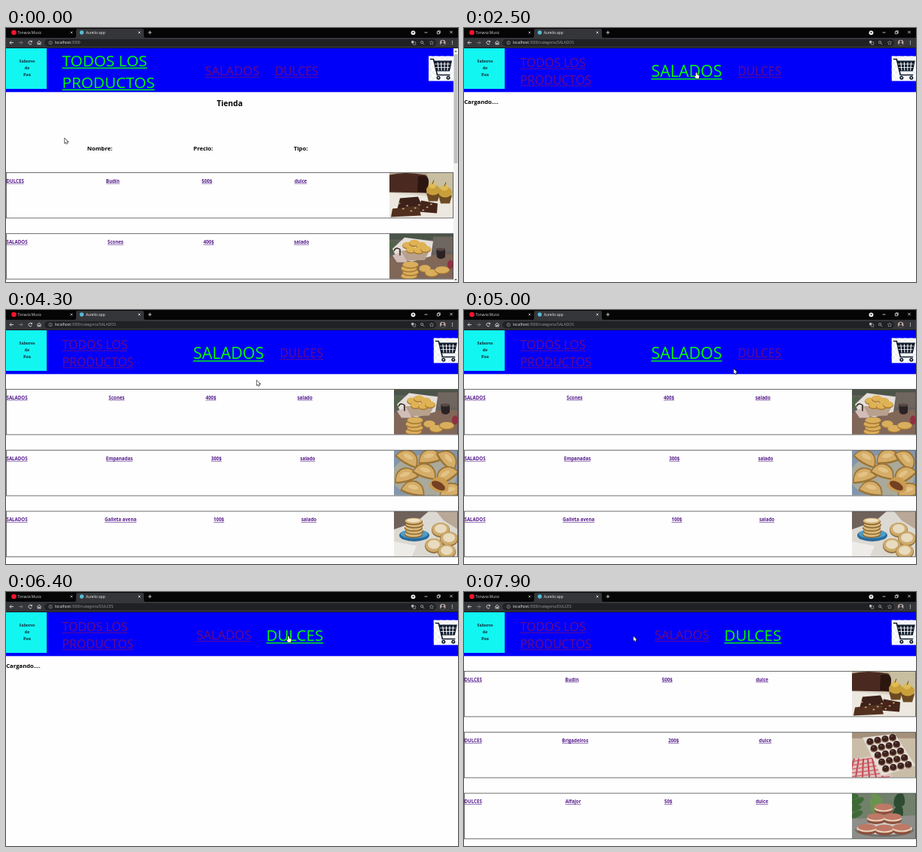
Animation, 600 px wide and 338 px high, one loop 8 s. Source, as an HTML page with a canvas:

```html
<!DOCTYPE html>
<html lang="es">
<head>
<meta charset="utf-8">
<title>Tienda</title>
<style>
html, body { margin: 0; width: 100%; height: 100%; overflow: hidden; background: #fff; }
canvas { display: block; width: 600px; height: 338px; }
</style>
</head>
<body>
<canvas id="stage"></canvas>
<script>
const W = 600, H = 338, LOOP = 8000;
const canvas = document.getElementById('stage');
const ctx = canvas.getContext('2d');
const dpr = window.devicePixelRatio || 1;
canvas.width = W * dpr;
canvas.height = H * dpr;

const SANS = '"Open Sans", "Noto Sans", sans-serif';
const GREEN = '#00ff00', VISITED = '#551a8b', NAV_LINK = '#6c0a80';

// ---- drawing helpers ----
function rect(x, y, w, h, color) {
  ctx.fillStyle = color;
  ctx.fillRect(x, y, w, h);
}
function oval(x, y, rx, ry, color, turn = 0) {
  ctx.fillStyle = color;
  ctx.beginPath();
  ctx.ellipse(x, y, rx, ry, turn, 0, 7);
  ctx.fill();
}
function path(d, color) {
  ctx.fillStyle = color;
  ctx.fill(new Path2D(d));
}
function line(d, color, width = 0.7) {
  ctx.strokeStyle = color;
  ctx.lineWidth = width;
  ctx.stroke(new Path2D(d));
}
function setFont(size, weight = 400, family = SANS) {
  ctx.font = `${weight} ${size}px ${family}`;
}
function text(s, x, y, color) {
  ctx.fillStyle = color;
  ctx.fillText(s, x, y);
  return ctx.measureText(s).width;
}
function link(s, x, y, color, gap, thick) {
  rect(x, y + gap, text(s, x, y, color), thick, color);
}
function at(x, y, draw) {
  ctx.save();
  ctx.translate(x, y);
  draw();
  ctx.restore();
}

// ---- product photos, 85 x 60 ----
function cookie(x, y, rx, ry, light = '#d9ae5c', dark = '#a87832') {
  oval(x, y + 1, rx, ry, dark);
  oval(x, y, rx * 0.94, ry * 0.9, light);
}
const photos = {
  cake() {
    rect(0, 0, 85, 60, '#d8d2c3');
    rect(0, 0, 85, 14, '#b9ad94');
    path('M50 0H85V30H52Z', '#c8bfa2');
    path('M0 27L85 34V60H0Z', '#ece8df');
    path('M0 3Q20 -2 48 3Q54 8 51 20L49 27L0 26Z', '#4a2a20');
    path('M38 5Q52 2 52 12L49 27L37 25Z', '#2c1610');
    for (const [x, y] of [[57, 20], [73, 23]]) {
      path(`M${x - 8} ${y + 7}h18l-3 11h-12z`, '#6c4a22');
      oval(x + 1, y + 3, 9, 7, '#c99f3a');
      oval(x, y - 3, 5, 4, '#dfbb57');
      line(`M${x} ${y - 5}l2 -5`, '#5a4520', 1);
    }
    path('M14 34L38 32L44 46L10 50Z', '#3b2119');
    path('M42 37L64 41L63 54L38 52Z', '#452419');
    path('M4 48L38 44L42 57L2 59Z', '#52301f');
    for (let i = 0; i < 9; i++) oval(13 + i * 5.3, 41 + i * 7 % 11, 1.5, 1.1, '#c3a17c');
  },
  scones() {
    rect(0, 0, 85, 60, '#62615d');
    rect(0, 0, 85, 8, '#4b5448');
    rect(58, 4, 27, 20, '#6f665f');
    path('M0 31L85 27V60H0Z', '#806758');
    oval(6, 18, 7, 9, '#53624a');
    path('M4 20L20 5L58 10L55 30L30 37L10 33Z', '#e4ddd9');
    path('M12 23L54 20L47 35L18 36Z', '#b7a18d');
    path('M4 29L16 24L24 38L10 38Z', '#d2bdb9');
    line('M6 23Q8 17 14 21V29', '#2b211e', 1.5);
    for (const [x, y] of [[24, 15], [33, 12], [42, 15], [29, 21], [39, 22], [48, 20]])
      cookie(x, y, 7, 4.5, '#dfb354');
    path('M62 20H74V31Q68 36 63 31Z', '#2b2225');
    oval(68, 21, 6, 2, '#574745');
    for (let i = 0; i < 4; i++) cookie(26 + i % 2 * 2, 56 - i * 5, 11, 4.5);
    cookie(47, 46, 8, 5);
    cookie(56, 52, 9, 5);
    cookie(70, 48, 10, 5);
    oval(81, 41, 4, 6, '#8f3140');
  },
  empanadas() {
    rect(0, 0, 85, 60, '#8296ad');
    oval(40, 34, 43, 28, '#a9a99c');
    for (const [x, y, turn] of [[18, 10, .5], [47, 9, -.2], [71, 12, .8], [15, 34, -.3],
      [41, 28, .3], [69, 33, -.6], [25, 51, .2], [75, 54, -.2]])
      at(x, y, () => {
        ctx.rotate(turn);
        path('M-16 6Q-12 -12 2 -11Q15 -9 17 7Q0 11 -16 6Z', '#9b7434');
        path('M-14 4Q-10 -10 2 -9Q12 -8 15 5Q0 8 -14 4Z', '#d5ad68');
        oval(0, -2, 7, 3, '#e2c286');
      });
    path('M46 47Q52 33 64 36Q74 40 72 54Q57 60 46 47Z', '#cb9c50');
    oval(59, 47, 10, 5, '#744022', .5);
  },
  oats() {
    rect(0, 0, 85, 60, '#dcd9d2');
    path('M0 0H46L31 13L0 24Z', '#6f625b');
    path('M56 0H85V24L66 12Z', '#b9a797');
    path('M0 40L30 46L24 60H0Z', '#eeece8');
    oval(27, 32, 20, 8, '#286b9c');
    oval(27, 30, 18, 6, '#4b9dc9');
    for (let i = 0; i < 5; i++) cookie(26 + i % 2, 30 - i * 4.3, 12, 4.5, '#d8b878', '#86602e');
    oval(26, 12, 9, 2.5, '#eee1c4');
    for (const [x, y] of [[62, 24], [73, 36], [53, 45], [70, 53]]) {
      cookie(x, y, 12, 10, '#cfac6c', '#937040');
      oval(x, y - 1, 8, 6, '#e8dbc0');
    }
  },
  truffles() {
    rect(0, 0, 85, 60, '#c9bda8');
    rect(0, 0, 85, 8, '#a4917b');
    path('M0 36L30 30L55 60H0Z', '#dfc2bf');
    for (let i = 0; i < 6; i++) {
      line(`M${i * 9 - 4} 60L${i * 6 + 3} 35`, '#c24650', 2);
      line(`M0 ${39 + i * 5}L${30 + i * 4} ${34 + i * 5}`, '#cd5860', 1.3);
    }
    path('M14 7L57 2L84 44L39 58Z', '#e5dfd6');
    for (let r = 0; r < 5; r++)
      for (let c = 0; c < 4; c++) {
        const x = 24 + c * 10 + r * 5.2, y = 12 - c * 1.8 + r * 9;
        oval(x, y + 2, 5, 3.5, '#957561');
        oval(x, y, 4.5, 4.2, '#3c211c');
        oval(x - 1, y - 1.5, 1.5, 1, '#6b4a40');
      }
  },
  alfajor() {
    rect(0, 0, 85, 60, '#71806a');
    for (let i = 0; i < 15; i++)
      oval(i * 29 % 85, 4 + i * 11 % 25, 9, 4, ['#3f6a38', '#6b9350', '#2d4c31'][i % 3], i);
    path('M0 34L85 29V60H0Z', '#8d8d89');
    oval(43, 49, 39, 9, '#6e706c');
    oval(43, 47, 37, 8, '#cfd1ca');
    for (const [x, y] of [[42, 19], [32, 32], [54, 32], [20, 46], [43, 47], [66, 46]]) {
      oval(x, y + 4, 12, 5, '#8d4f3c');
      oval(x, y + 1.5, 12, 4, '#ead2ba');
      oval(x, y - 1, 12, 4.5, '#bd7966');
    }
  }
};
function photo(kind, x, y) {
  at(x, y, () => {
    ctx.beginPath();
    ctx.rect(0, 0, 85, 60);
    ctx.clip();
    photos[kind]();
  });
}

// ---- browser window ----
function cross(x, y, r, color) {
  line(`M${x - r} ${y - r}l${2 * r} ${2 * r}m0 ${-2 * r}l${-2 * r} ${2 * r}`, color, 0.7);
}
function drawBrowser(route) {
  const icon = '#d4d5d8';
  rect(0, 0, W, 27, '#050506');
  path('M91 13Q93 13 93 10V3Q93 1 95 1H181Q183 1 183 3V10Q183 13 185 13Z', '#35363a');
  rect(0, 13, W, 13.5, '#35363a');
  oval(10.5, 6, 3.3, 3.3, '#f5142c');
  oval(100.5, 6, 2.7, 2.7, '#58b9d2');
  setFont(4.8);
  text('Tonavia Music', 15.5, 7.9, '#d8d9dc');
  text('Aurelio app', 106, 7.9, '#f0f0f0');
  cross(87, 6, 1.4, icon);
  cross(177, 6, 1.4, '#fff');
  line('M188.7 6h4.6m-2.3 -2.3v4.6', '#eee', 0.8);
  oval(540.5, 6.3, 2.9, 2.9, '#f4f4f4');
  path('M539 5.6h3l-1.5 2z', '#111');
  line('M555.5 6h4M572.3 4.8h3v3h-3zM573.3 4.8v-1h3v3h-1', '#fff', 0.7);
  cross(591, 5.5, 1.7, '#fff');

  line('M10 19.5H5m2.3 -2.3L5 19.5l2.3 2.3', '#eee', 0.8);
  line('M17 19.5h5m-2.3 -2.3l2.3 2.3l-2.3 2.3', '#85868a', 0.8);
  line('M34 18a2.3 2.3 0 1 0 .3 2.5M34.4 16.8v1.8h-1.8', '#eee', 0.8);
  line('M41.3 19.6L44 17l2.7 2.6M42 19v3h1.4v-2h1.2v2H46v-3', '#eee', 0.7);
  ctx.beginPath();
  ctx.roundRect(51, 15, 520, 9.4, 4.7);
  ctx.fillStyle = '#202124';
  ctx.fill();
  line('M61.3 19.6a2.2 2.2 0 1 0 -4.4 0a2.2 2.2 0 1 0 4.4 0M59.1 19.2v1.6M59.1 18.1v.6', '#aaa', 0.6);
  setFont(5);
  const host = text('localhost', 65, 21.4, '#f0f0f0');
  text(':3000' + route, 65 + host, 21.4, '#9aa0a6');
  rect(538.2, 17, 3, 3.4, '#b8bbc0');
  line('M541.7 18.6h2v3.6h-3v-1.3', '#b8bbc0', 0.6);
  line('M553.7 19a1.6 1.6 0 1 0 -3.2 0a1.6 1.6 0 1 0 3.2 0M553.3 20.2l2 2', '#bbb', 0.7);
  line('M565 17l.8 1.7l1.9 .2l-1.4 1.3l.4 1.9l-1.7 -1l-1.7 1l.4 -1.9l-1.4 -1.3l1.9 -.2z', '#bbb', 0.5);
  oval(579.7, 19.6, 3.8, 3.8, '#b7a9a5');
  oval(579.7, 18.2, 1.4, 1.6, '#342d31');
  path('M577 22.3Q577 20 579.7 20Q582.4 20 582.4 22.3Q579.7 24 577 22.3Z', '#342d31');
  for (let i = -1; i < 2; i++) oval(592.5, 19.6 + i * 1.9, 0.6, 0.6, '#eee');
}

function drawCart(x) {
  at(x, 37.5, () => {
    rect(0, 0, 33, 33, '#fff');
    for (let i = 0; i < 32; i++) rect(i % 4 * 8 + (i >> 2) % 2 * 4, (i >> 2) * 4, 4, 4, '#f1f1f3');
    const ink = '#0d1a2c';
    path('M7 6H31L28 20H10Z', ink);
    line('M2 4h4.5l5 21h17', ink, 1.6);
    for (let i = 0; i < 4; i++) line(`M${12 + i * 4.6} 8l${1.2 - i * .7} 11`, '#fff', 1.1);
    line('M8 10.5H29M9 15H28', '#fff', 0.8);
    for (const cx of [13, 26]) {
      oval(cx, 28.7, 2.5, 2.5, ink);
      oval(cx, 28.7, 0.9, 0.9, '#fff');
    }
  });
}

// ---- pages ----
const item = (cat, name, price, type, pic) => ({ cells: [cat, name, price, type], pic });
const budin = item('DULCES', 'Budín', '500$', 'dulce', 'cake');
const scones = item('SALADOS', 'Scones', '400$', 'salado', 'scones');
const pages = {
  home: { route: '', width: 594, top: 192.5, active: 0, x: [74.5, 264, 357], items: [budin, scones] },
  salados: {
    route: '/categoria/SALADOS', width: 600, top: 105.5, active: 1, x: [74.5, 248.5, 363.5],
    items: [scones, item('SALADOS', 'Empanadas', '300$', 'salado', 'empanadas'),
      item('SALADOS', 'Galleta avena', '100$', 'salado', 'oats')]
  },
  dulces: {
    route: '/categoria/DULCES', width: 600, top: 105.5, active: 2, x: [74.5, 253, 345.5],
    items: [budin, item('DULCES', 'Brigadeiros', '200$', 'dulce', 'truffles'),
      item('DULCES', 'Alfajor', '50$', 'dulce', 'alfajor')]
  }
};
const labels = [['TODOS LOS', 'PRODUCTOS'], ['SALADOS'], ['DULCES']];
const sizes = [[15.95, 20.7], [16.5, 21.4], [15.6, 20.5]];

// Returns the horizontal extent of each link for the pointer test.
function drawNav(page) {
  rect(0, 27, W, 58.3, '#0000fa');
  rect(0, 27, 54, 54, '#12f6f2');
  setFont(5.2, 700, '"Noto Serif", serif');
  ctx.textAlign = 'center';
  ['Sabores', 'de', 'Pau'].forEach((s, i) => text(s, 28, 46 + i * 8.8, '#10202c'));
  ctx.textAlign = 'left';
  drawCart(page.width - 33 + (page.width === W ? 0.8 : 0));
  return labels.map((lines, i) => {
    const on = page.active === i;
    const color = on ? GREEN : NAV_LINK;
    setFont(sizes[i][+on]);
    const step = on ? 29 : 22.6;
    const first = lines.length > 1 ? (on ? 50.6 : 52.2) : (on ? 65.2 : 63.4);
    lines.forEach((s, k) =>
      link(s, page.x[i], first + k * step, color, on ? 2 : 1.6, on ? 1.4 : 0.9));
    return [page.x[i], page.x[i] + ctx.measureText(lines[0]).width];
  });
}

// Cells are spread evenly between the edges.
function drawRow({ cells, pic }, y, width) {
  setFont(6.15, 700);
  const widths = cells.map(s => ctx.measureText(s).width);
  const gap = (width - 1 - 85 - widths.reduce((a, b) => a + b)) / 4;
  let x = 0.5;
  cells.forEach((s, i) => {
    link(s, x, y + 13.4, VISITED, 0.8, 0.6);
    x += widths[i] + gap;
  });
  photo(pic, width - 85, y);
  ctx.strokeStyle = '#4a4a4a';
  ctx.lineWidth = 0.8;
  ctx.strokeRect(0.4, y, width - 0.8, 60.4);
}

function drawHome() {
  setFont(10.2, 700);
  text('Tienda', 279.8, 104.2, '#000');
  setFont(7.7, 700);
  text('Nombre:', 107.8, 163.2, '#000');
  text('Precio:', 248.8, 163.2, '#000');
  text('Tipo:', 382, 163.2, '#000');
  rect(594, 27, 6, 311, '#f1f1f1');
  rect(594.5, 35, 5, 145, '#c1c1c1');
  path('M595.3 32h3.4l-1.7 -2z', '#505050');
  path('M595.3 334h3.4l-1.7 2z', '#505050');
}

// ---- pointer ----
const moves = [
  [0, 78, 147], [100, 78, 147], [400, 52, 168], [900, 196, 145], [1200, 292.5, 88],
  [1800, 307, 66], [2200, 308.5, 59], [3500, 308.5, 59], [4300, 333, 94],
  [4700, 336, 94], [5200, 370, 70], [5500, 375, 58.5], [7300, 375, 58.5],
  [7800, 225, 59], [8000, 225, 59]
];
function pointerAt(t) {
  const i = Math.max(1, moves.findIndex(m => m[0] > t));
  const [t0, x0, y0] = moves[i - 1], [t1, x1, y1] = moves[i];
  const k = (t - t0) / (t1 - t0), e = k * k * (3 - 2 * k);
  return [x0 + (x1 - x0) * e, y0 + (y1 - y0) * e];
}
function drawPointer(x, y, hand) {
  at(x, y, () => {
    const d = hand
      ? 'M-.8 .8Q0 -.4 .8 .8V3.2L3 3.7Q4 4 3.8 5.4L3 8.2H-.6L-2.6 5.2Q-2.4 4.2 -.8 5.2Z'
      : 'M0 0V6.1L1.4 4.8L2.4 7L3.4 6.5L2.4 4.4H4.4Z';
    line(d, '#111', 1.1);
    path(d, '#fff');
  });
}

// ---- timeline ----
function stateAt(t) {
  if (t < 2450) return { page: pages.home, loading: false };
  if (t < 6250) return { page: pages.salados, loading: t < 3500 };
  return { page: pages.dulces, loading: t < 7300 };
}
function draw(t) {
  const { page, loading } = stateAt(t);
  ctx.setTransform(dpr, 0, 0, dpr, 0, 0);
  rect(0, 0, W, H, '#fefefe');
  drawBrowser(page.route);
  const spans = drawNav(page);
  if (loading) {
    setFont(7.7, 700);
    text('Cargando....', 0.2, 100.6, '#000');
  } else {
    page.items.forEach((it, i) => drawRow(it, page.top + i * 81.2, page.width));
  }
  if (page === pages.home) drawHome();
  const [x, y] = pointerAt(t);
  const hand = y > 48 && y < 68 && spans.some(([a, b]) => x >= a && x <= b);
  drawPointer(x, y, hand);
}

const start = performance.now();
function tick() {
  draw((performance.now() - start) % LOOP);
  requestAnimationFrame(tick);
}
tick();
</script>
</body>
</html>
```
